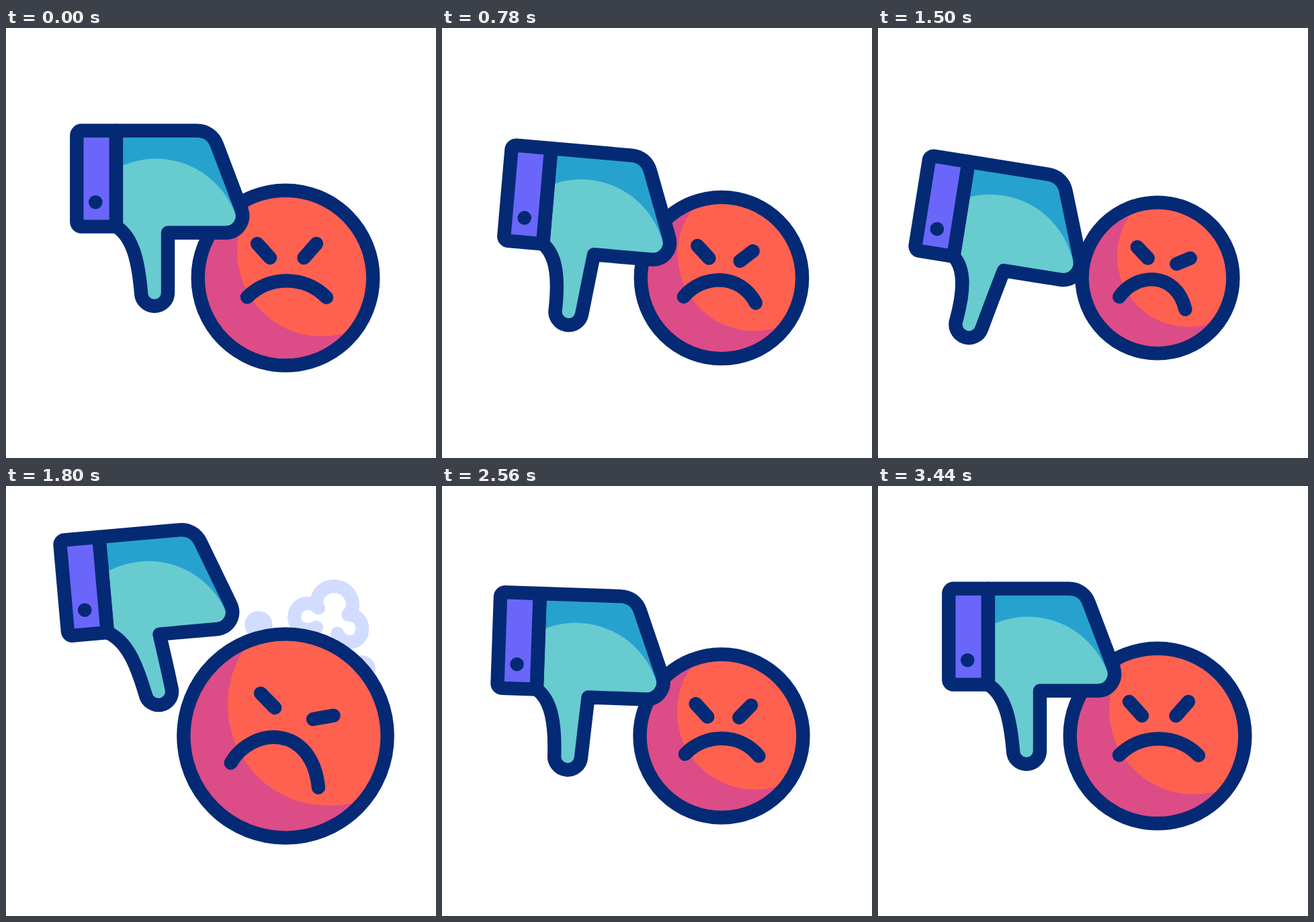
These frames come from a looping animation (640x640 px, 3600 ms). An HTML page:

```html
<!DOCTYPE html>
<html lang="en">
<head>
<meta charset="utf-8">
<title>Thumb down</title>
<style>
  html, body { margin: 0; width: 100%; height: 100%; overflow: hidden; background: #fff; }
  svg { display: block; width: 100vw; height: 100vh; }
  .line, .smoke { fill: none; stroke-linecap: round; stroke-linejoin: round; }
  .line { stroke: #042a75; stroke-width: 20.4; }
  .smoke { stroke: #d2dcfe; }
</style>
</head>
<body>
<svg viewBox="0 0 640 640">
  <defs>
    <clipPath id="faceClip"><circle id="faceMask" cx="416" cy="372"/></clipPath>
    <clipPath id="palmClip"><path id="palmMask"/></clipPath>
  </defs>

  <g id="smoke" class="smoke">
    <g id="cloud">
      <path d="M-15-11C-25-22-50-21-51 3C-51 21-30 25-18 18"/>
      <path d="M-18-17C-18-52 34-52 36-16C36-9 32-3 29-1C44-1 50 10 50 20C50 43 23 47 13 27"/>
    </g>
    <circle id="puffL" r="10.6"/>
    <circle id="puffR" r="10.6"/>
  </g>

  <g clip-path="url(#faceClip)">
    <rect x="200" y="160" width="430" height="430" fill="#dc4c87"/>
    <circle id="glow" fill="#ff6150"/>
  </g>
  <circle id="rim" class="line" cx="416" cy="372"/>
  <path id="features" class="line"/>

  <g id="hand">
    <g clip-path="url(#palmClip)">
      <rect x="150" y="140" width="220" height="300" fill="#27a2cf"/>
      <circle cx="223" cy="320.5" r="126" fill="#67cbd0"/>
    </g>
    <path id="palm" class="line"/>
    <path class="line" style="fill:#6a66fa"
      d="M163.8 152.8H112.3A7 7 0 0 0 105.3 159.8V288.6A7 7 0 0 0 112.3 295.6H163.8Z"/>
    <circle cx="133.3" cy="259.3" r="10.3" fill="#042a75"/>
  </g>
</svg>

<script>
const LOOP = 3600;
const $ = id => document.getElementById(id);
const set = (id, attrs) => {
  for (const k in attrs) $(id).setAttribute(k, attrs[k]);
};

// Value at time t, easing in and out between the turning points.
function eased(t, times, vals) {
  let i = 0;
  while (i < times.length - 2 && t > times[i + 1]) i++;
  const u = Math.min(1, Math.max(0, (t - times[i]) / (times[i + 1] - times[i])));
  return vals[i] + (vals[i + 1] - vals[i]) * u * u * (3 - 2 * u);
}

// Rest, wind-up, burst, recoil, small rebound, rest.
const turns = [110, 1440, 1940, 2350, 2800, 3400];
const swing = (t, windUp, burst, recoil, rebound) =>
  eased(t, turns, [0, windUp, burst, recoil, rebound, 0]);

// The hand drifts left with growing speed, then wobbles sideways.
function drift(t) {
  const u = Math.max(0, (t - 110) / 1430);
  if (u < 1) return -48 * u * u;
  return eased(t, [1540, 1780, 1940, 2200, 2400, 2800, 3080, 3400],
    [-48, -15, -38, 3.3, -36, 4, -4, 0]);
}

// Resting points from the face centre, and how a scowl moves each one:
// left eye, right eye, mouth curve.
const calm  = [[-42, -51], [-23, -30], [46, -51], [27.5, -30],
  [-57, 28.5], [-25, -4], [29, -4], [61, 29]];
const frown = [[12, -4], [11, -7], [18, 29], [9, 10],
  [-15, 7], [-21, -9], [5, -14], [-22, 43]];

function featurePath(scale, scowl) {
  const p = calm.map(([x, y], i) => [
    (416 + x * scale + frown[i][0] * scowl).toFixed(2),
    (372 + y * scale + frown[i][1] * scowl).toFixed(2)
  ].join(' '));
  return `M${p[0]}L${p[1]}M${p[2]}L${p[3]}M${p[4]}C${p.slice(5).join(' ')}`;
}

function palmPath(bend, lift) {
  const a = -0.6 * bend * Math.PI / 180, c = Math.cos(a), s = Math.sin(a);
  // Point in the thumb tip's own frame.
  const tip = (x, y) => [
    (221 + bend + x * c - y * s).toFixed(2),
    (394 - lift + x * s + y * c).toFixed(2)
  ].join(' ');
  return 'M164 152.8H284C297 152.8 309 160 314 174L350 269C357 287 345 304.8 327 304.8H241'
    + `C${241 + bend * 0.35} 335 ${tip(20, -40)} ${tip(20, 0)}A20 20 0 0 1 ${tip(-20, 0)}`
    + `C${tip(-24, -46)} ${189 + bend * 0.3} 311 164 295.6Z`;
}

function drawSmoke(t) {
  const p = (t - 1700) / 460, on = p > 0 && p < 1;
  $('smoke').style.display = on ? '' : 'none';
  if (!on) return;
  const reach = 0.6 + 1.12 * (1 - (1 - p) ** 1.8), size = Math.min(1, reach);
  const place = (id, x, y) => set(id, {
    transform: `translate(${416 + x * reach} ${372 + y * reach}) scale(${size})`
  });
  place('cloud', 64, -179);
  place('puffL', -40, -165);
  place('puffR', 113, -99);
  set('smoke', { 'stroke-width': 20 * Math.min(1, (1 - p) * 2.5) });
}

function draw(t) {
  const r = 130.3 + swing(t, -20, 31, -17, 1.1);
  const scale = r / 130.3, light = 1 + 1.2 * (scale - 1);
  const scowl = swing(t, 0.48, 1.12, 0.12, 0);
  set('rim', { r });
  set('faceMask', { r: r + 1 });
  set('glow', { cx: 416 + 54 * light, cy: 372 - 39 * light, r: 126 * light });
  set('features', { d: featurePath(scale, scowl) });

  const d = palmPath(swing(t, -20, 18.3, -15.2, 2), 4 * scowl);
  set('palm', { d });
  set('palmMask', { d });
  const x = 133.3 + drift(t), y = 259.3 + swing(t, 46, -102.7, 16, -6);
  const tilt = swing(t, 9.8, -8.5, 3.9, -0.3);
  set('hand', {
    transform: `translate(${x} ${y}) rotate(${tilt}) translate(-133.3 -259.3)`
  });
  drawSmoke(t);
}

const start = performance.now();
function tick() {
  draw((performance.now() - start) % LOOP);
  requestAnimationFrame(tick);
}
draw(0);
requestAnimationFrame(tick);
</script>
</body>
</html>
```
